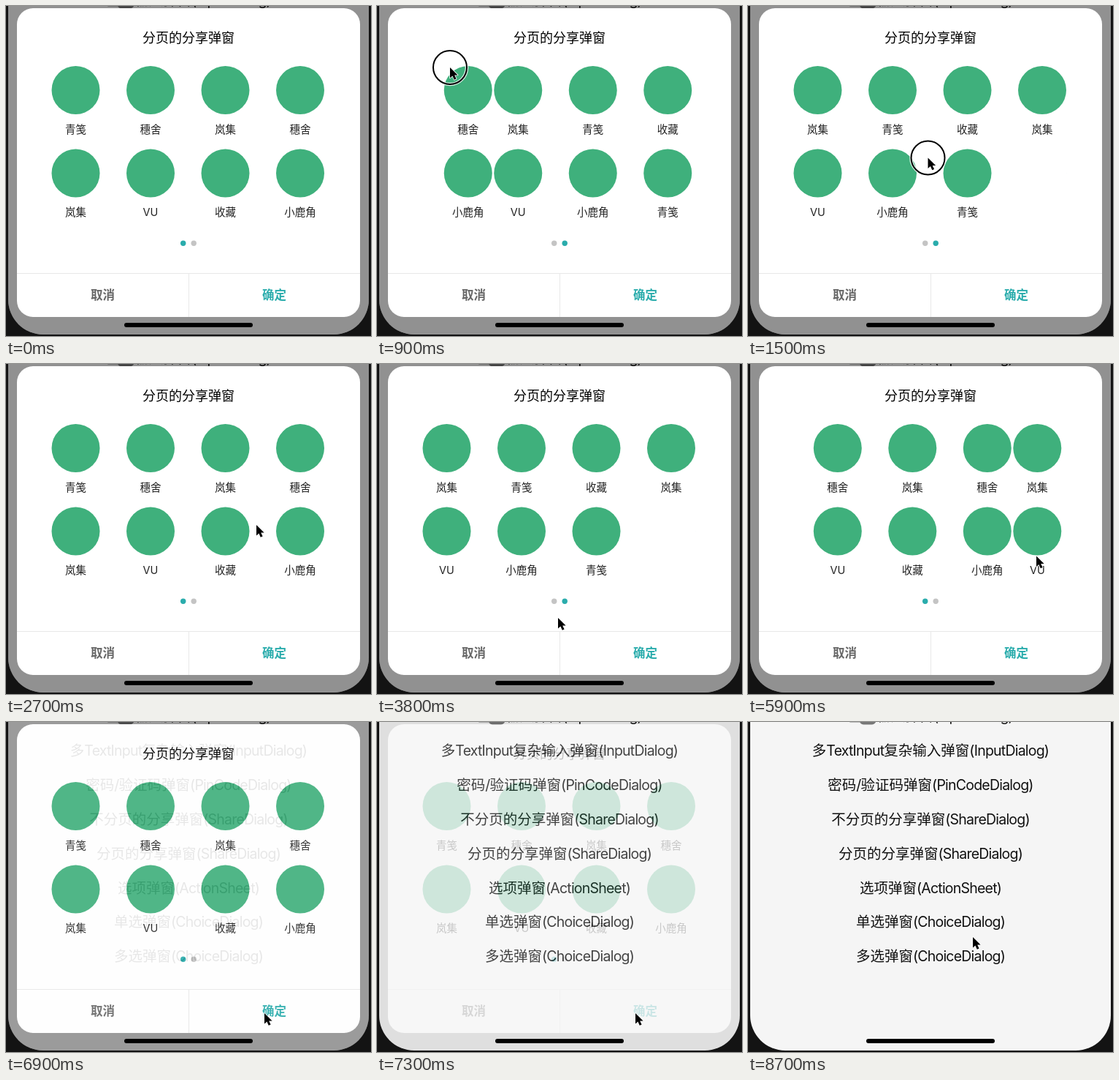
Write an HTML page that moves like this. It is 500 by 451 pixels and loops after 9.3 s.

```html
<!DOCTYPE html>
<html lang="zh-CN">
<head>
<meta charset="utf-8">
<title>分页的分享弹窗</title>
<style>
  html, body { margin: 0; width: 100%; height: 100%; overflow: hidden; background: #131313; }
  svg { display: block; width: 500px; height: 451px; }
  text { font-family: Inter, "Noto Sans CJK SC", "Noto Sans CJK", sans-serif; text-anchor: middle; }
  .row { font-size: 19.5px; fill: #111; }
  .row tspan { letter-spacing: -.04em; }
  .title { font-size: 18px; font-weight: 500; }
  .label { font-size: 14.5px; fill: #222; }
  .button { font-size: 16.5px; font-weight: 600; }
</style>
</head>
<body>
<svg viewBox="0 0 500 451">
  <defs>
    <clipPath id="screen"><rect x="3" y="-100" width="494" height="549" rx="48"/></clipPath>
    <clipPath id="pager"><rect x="62" y="76" width="376" height="230"/></clipPath>
  </defs>
  <g clip-path="url(#screen)">
    <rect width="500" height="451" fill="#f5f5f5"/>
    <g id="list"></g>
    <rect x="153" y="-18" width="22" height="21.5" rx="5" fill="#777"/>
    <g id="modal">
      <rect width="500" height="451" opacity=".41"/>
      <rect x="15" y="3" width="470" height="422" rx="22" fill="#fff"/>
      <text class="title" x="250" y="49.5">分页的分享弹窗</text>
      <g clip-path="url(#pager)"><g id="pages"></g></g>
      <circle class="dot" cx="242.7" cy="324.3" r="3.7"/>
      <circle class="dot" cx="257.2" cy="324.3" r="3.7"/>
      <path d="M15 365.5H485M250.5 365V425" stroke="#e8e8e8"/>
      <text class="button" x="132.5" y="401" fill="#666">取消</text>
      <text class="button" x="367.5" y="401" fill="#2aacac">确定</text>
    </g>
    <rect x="162" y="433" width="176" height="6" rx="3"/>
  </g>
  <g id="cursor">
    <g id="ring" fill="none">
      <circle r="23" stroke="#fff" stroke-width="4.5" opacity=".8"/>
      <circle r="23" stroke="#000" stroke-width="2"/>
    </g>
    <path d="M0 0V14.5L3.4 11.4L5.8 16.8L8.6 15.6L6.2 10.4H10.6Z" stroke="#fff" stroke-width="1.6" paint-order="stroke" stroke-linejoin="round"/>
  </g>
</svg>
<script>
const LOOP = 9300, STEP = 100, PAGE_WIDTH = 376;
const $ = id => document.getElementById(id);

const rows = [
  '基础输入弹窗(InputDialog)',
  '多TextInput复杂输入弹窗(InputDialog)',
  '密码/验证码弹窗(PinCodeDialog)',
  '不分页的分享弹窗(ShareDialog)',
  '分页的分享弹窗(ShareDialog)',
  '选项弹窗(ActionSheet)',
  '单选弹窗(ChoiceDialog)',
  '多选弹窗(ChoiceDialog)'
];
const pages = [
  ['青笺', '穗舍', '岚集', '穗舍', '岚集', 'VU', '收藏', '小鹿角'],
  ['岚集', '青笺', '收藏', '岚集', 'VU', '小鹿角', '青笺']
];

// [time, x, y]
const path = [
  [100, 330, 385], [400, 390, 235], [500, 385, 230], [900, 100, 84], [1100, 72, 64],
  [1300, 170, 150], [1500, 246.5, 207.5], [1800, 335, 425], [1900, 345, 425],
  [2100, 358, 375], [2400, 350, 250], [2700, 343, 220], [2900, 430, 225],
  [3000, 405, 228], [3400, 110, 240], [3800, 248, 347], [4000, 340, 200],
  [4300, 405, 113], [4500, 405, 113], [4800, 94, 115], [4900, 94, 115],
  [5100, 192, 112.5], [5300, 192, 112.5], [5500, 160, 240], [5800, 395, 245],
  [6000, 395, 280], [6400, 354, 398], [7500, 354, 398], [7800, 308, 294]
];
// [time, page offset]
const scroll = [
  [500, 0], [900, .74], [1100, .83], [1300, 1], [1500, 1], [1800, .3], [2000, 0],
  [2900, 0], [3000, .07], [3400, .85], [3600, 1], [5500, 1], [5800, .4], [6000, 0]
];
const holds = [[400, 1200], [1500, 1900], [2900, 3500], [4300, 4500], [4800, 5000],
  [5100, 5300], [5500, 5900], [6600, 6800]];
// [item on the second page, start, end]
const taps = [[3, 4300, 4600], [0, 4800, 5000], [1, 5100, 5400]];

function sample(track, t) {
  const next = track.findIndex(key => key[0] > t);
  if (next === 0) return track[0].slice(1);
  if (next < 0) return track[track.length - 1].slice(1);
  const a = track[next - 1], b = track[next];
  const p = (t - a[0]) / (b[0] - a[0]);
  return a.slice(1).map((v, i) => v + (b[i + 1] - v) * p);
}

$('list').innerHTML = rows.map((row, i) => {
  const text = row.replace(/[ -~]+/g, '<tspan>$&</tspan>');
  return `<text class="row" x="250" y="${(-0.7 + 46.85 * i).toFixed(2)}">${text}</text>`;
}).join('');

$('pages').innerHTML = pages.map((names, page) => names.map((name, i) => {
  const x = 95.5 + 102.5 * (i % 4) + PAGE_WIDTH * page;
  const y = 115 + 113.5 * (i >> 2);
  return `<g transform="translate(${x} ${y})"><circle r="33" fill="#3fb07c"/>` +
    `<text class="label" y="58.5">${name}</text></g>`;
}).join('')).join('');

const items = [...$('pages').children].slice(pages[0].length);
const dots = document.querySelectorAll('.dot');

function draw(t) {
  const [offset] = sample(scroll, t);
  $('pages').setAttribute('transform', `translate(${-offset * PAGE_WIDTH} 0)`);
  dots.forEach((dot, i) => dot.setAttribute('fill', Math.round(offset) === i ? '#2aacac' : '#c4c4c4'));

  for (const [index, start, end] of taps) {
    const down = t >= start && t < end;
    const [icon, label] = items[index].children;
    icon.setAttribute('r', down ? 31 : 33);
    label.setAttribute('opacity', down ? .6 : 1);
  }

  const fade = Math.min(1, Math.max(0, (t - 6800) / 600));
  $('modal').setAttribute('opacity', 1 - fade ** 1.3);

  const [x, y] = sample(path, t);
  $('cursor').setAttribute('transform', `translate(${x} ${y})`);
  $('cursor').setAttribute('visibility', t < 100 ? 'hidden' : 'visible');
  $('ring').setAttribute('opacity', holds.some(([a, b]) => t >= a && t < b) ? 1 : 0);
}

const begin = performance.now();
function tick() {
  const t = (performance.now() - begin) % LOOP;
  draw(Math.floor(t / STEP) * STEP);
  requestAnimationFrame(tick);
}
tick();
</script>
</body>
</html>
```
